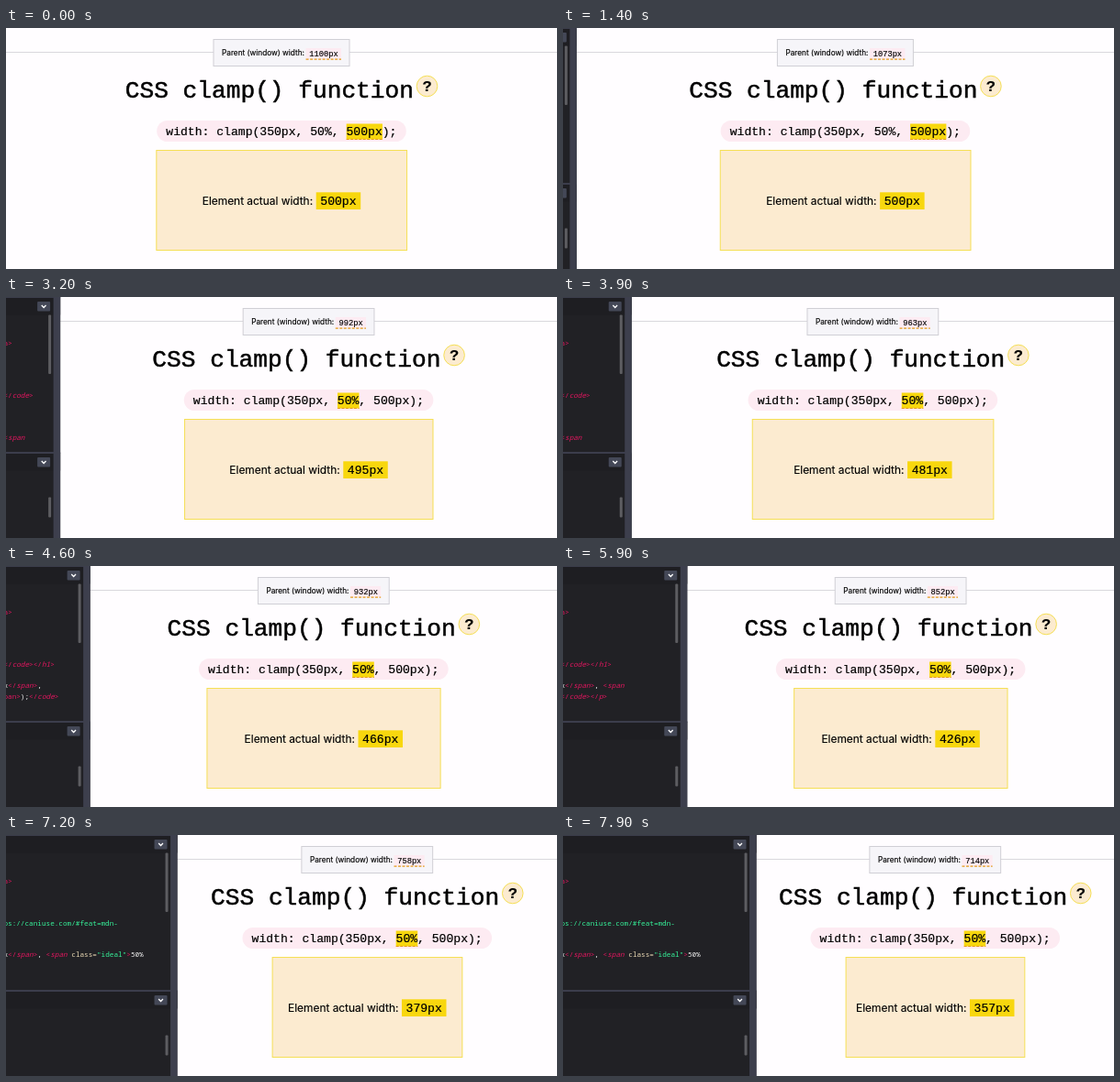
These frames come from a looping animation (600 by 263 pixels, 8 s). An HTML page:

```html
<!DOCTYPE html>
<html lang="en">
<head>
<meta charset="utf-8">
<title>CSS clamp() function</title>
<style>
  html, body { margin: 0; width: 100%; height: 100%; overflow: hidden; background: #fffdff; }
  svg { display: block; width: 600px; height: 263px; }
  text { white-space: pre; font-family: Inter, "Open Sans", sans-serif; fill: #000; stroke: #000; stroke-width: .15px; }
  .mono { font-family: "Liberation Mono", monospace; }
  .title { font-size: 26.18px; stroke-width: .5px; }
  .code { font-size: 13.09px; stroke-width: .2px; }
  .hot { fill: #f8d70e; }
  .pink { fill: #fdebf2; }
  .cream { fill: #fcebd0; stroke: #f5df55; }
  .dash { stroke: #e39a1c; stroke-width: 1.2; stroke-dasharray: 3 1.5; }
  .rim { fill: #434556; }
  #lines text { font-family: "Noto Sans Mono", monospace; font-size: 7.7px; fill: #f4f4f4; stroke: none; }
  #lines .tag { fill: #e3165f; }
  #lines .name { font-style: italic; }
  #lines .attr { fill: #ead9b4; }
  #lines .str { fill: #36f39a; }
</style>
</head>
<body>
<svg viewBox="0 0 600 263">
  <rect width="600" height="263" fill="#fffdff"/>
  <path d="M0 26.5H600" stroke="#d9d8dd"/>

  <g id="page">
    <rect id="label" y="12.5" height="29" fill="#f6f5f9" stroke="#d0cfd5"/>
    <text id="labelText" y="30" font-size="8.25">Parent (window) width:</text>
    <rect id="parentBg" class="pink" y="22" height="12"/>
    <path id="parentDash" class="dash"/>
    <text id="parent" class="mono" y="30.5" font-size="8.727"></text>

    <text class="mono title" x="129.8" y="76">CSS clamp() function</text>
    <circle class="cream" cx="458.5" cy="63.5" r="11.3"/>
    <text class="mono" x="458.5" y="69" font-size="17" font-weight="700" text-anchor="middle">?</text>

    <rect class="pink" x="164.2" y="101" width="271.6" height="23" rx="11.5"/>
    <rect id="hot" class="hot" y="104.5" height="17"/>
    <path id="hotDash" class="dash"/>
    <text class="mono code" x="174.3" y="117">width: clamp(350px, 50%, 500px);</text>

    <rect id="box" class="cream" y="133.5" height="109"/>
    <text x="213.8" y="193" font-size="11.9">Element actual width:</text>
    <rect class="hot" x="337.7" y="179.3" width="48.5" height="18.7"/>
    <text id="actual" class="mono code" x="342.3" y="193"></text>
  </g>

  <g id="panel">
    <rect x="-300" width="300" height="263" fill="#212125"/>
    <g id="head">
      <rect x="-300" width="300" height="19.5" fill="#1e1e22"/>
      <rect class="rim" x="-300" y="-.8" width="300" height="1.6"/>
      <rect x="-25" y="5" width="14" height="10.5" rx="1" fill="#444857"/>
      <path d="M-20.4 9l2.4 2.5l2.4-2.5" fill="none" stroke="#fff" stroke-width="1.3"/>
    </g>
    <use href="#head" y="170"/>
    <rect x="-13" y="19.5" width="3" height="64.5" rx="1" fill="#5d5d61"/>
    <rect x="-13" y="218.5" width="3" height="22" rx="1" fill="#5d5d61"/>
    <rect x="-7.5" width="7.5" height="263" fill="#3d3f4d"/>
  </g>
  <g id="lines"></g>
</svg>
<script>
const $ = id => document.getElementById(id);
const set = (id, attrs) => {
  for (const key in attrs) $(id).setAttribute(key, attrs[key]);
};

const SCALE = 600 / 1100, CHAR = 7.855, SMALL = 5.236;

// time in ms, window width in CSS px
const drag = [[0, 1100], [900, 1100], [1800, 1051], [2300, 1034], [2700, 1015],
  [3200, 991.6], [3600, 977], [4500, 935], [4600, 932], [5400, 877],
  [5900, 852], [6300, 825], [7200, 758], [7900, 714], [8000, 714]];

// editor lines that wrap with the panel: smallest and largest panel width, baseline, text
const wraps = [
  [20, 999, 53, "a>"],
  [58, 81, 110, "</code>"],
  [81, 150, 110, "</code></h1>"],
  [150, 999, 99, "ps://caniuse.com/#feat=mdn-"],
  [49, 85, 156, "<span"],
  [85, 95, 133, "x</span>,"],
  [85, 95, 145, "pan>);</code>"],
  [95, 179, 133, "x</span>, <span"],
  [95, 179, 145, "</code></p>"],
  [179, 999, 133, 'x</span>, <span class="ideal">50%']
];

const span = (cls, s) => `<tspan class="${cls}">${s}</tspan>`;
const paint = src => src.replace(
  /(<\/?)(\w+)|(^ps:.*|"\w+")|(class=)|^(?:a|pan)>|>/g,
  (all, open, name, str, attr) => {
    if (name) return span("tag", open.replace("<", "&lt;")) + span("tag name", name);
    return span(str ? "str" : attr ? "attr" : "tag", all.replace(">", "&gt;"));
  });

$("lines").innerHTML = wraps.map(([, , y, src]) =>
  `<text x="-2.6" y="${y}">${paint(src)}</text>`).join("");

function widthAt(t) {
  const i = drag.findIndex(p => p[0] > t);
  const [t0, w0] = drag[i - 1], [t1, w1] = drag[i];
  return w0 + (w1 - w0) * (t - t0) / (t1 - t0);
}

function draw(t) {
  const win = widthAt(t), edge = 600 - win * SCALE;
  set("page", { transform: `translate(${edge / 2})` });
  set("panel", { transform: `translate(${edge})` });

  const parent = Math.round(win) + "px", codeW = parent.length * SMALL + 7;
  const labelW = codeW + 109.6, left = 300 - labelW / 2, codeX = left + labelW - 9 - codeW;
  $("parent").textContent = parent;
  set("label", { x: left, width: labelW });
  set("labelText", { x: left + 9 });
  set("parentBg", { x: codeX, width: codeW });
  set("parentDash", { d: `M${codeX} 34.2h${codeW}` });
  set("parent", { x: codeX + 3.7 });

  const capped = win >= 1000;
  const hotX = 174.3 + CHAR * (capped ? 25 : 20), hotW = CHAR * (capped ? 5 : 3);
  set("hot", { x: hotX, width: hotW });
  set("hotDash", { d: `M${hotX} 121.5h${hotW}` });

  const size = Math.min(500, win / 2), boxW = size * SCALE;
  $("actual").textContent = Math.floor(size) + "px";
  set("box", { x: 300.2 - boxW / 2, width: boxW });

  wraps.forEach(([min, max], i) => {
    $("lines").children[i].style.display = edge >= min && edge < max ? "" : "none";
  });
}

const start = performance.now();
function tick() {
  const t = (performance.now() - start) % 8000;
  draw(Math.floor(t / 100) * 100);
  requestAnimationFrame(tick);
}
tick();
</script>
</body>
</html>
```
